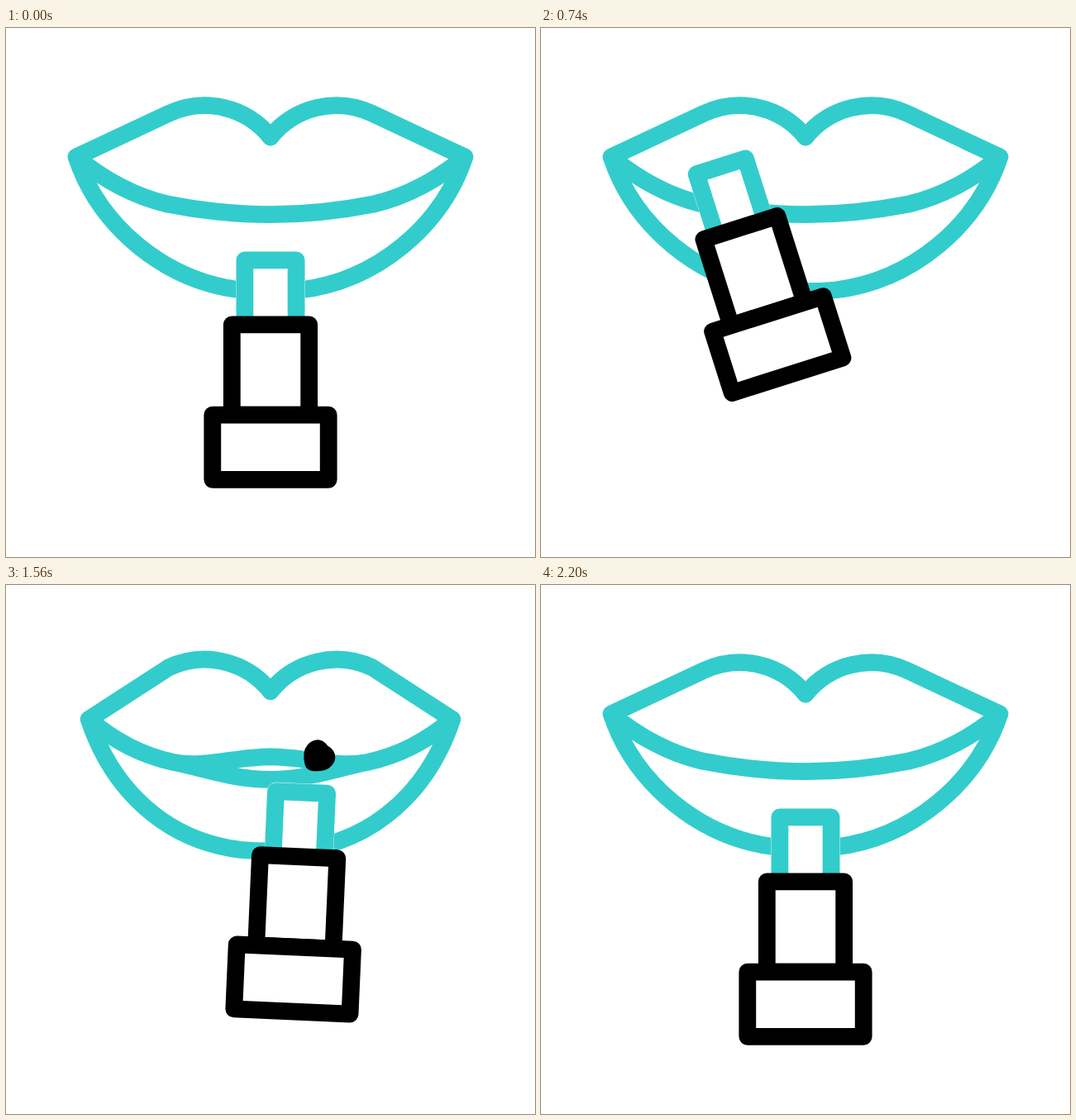
Recreate the animation shown at these times as an HTML page. Size 640x640 px, loop 2.4 s.

```html
<!DOCTYPE html>
<html lang="en">
<head>
<meta charset="utf-8">
<title>Lipstick</title>
<style>
  html, body { margin: 0; width: 100%; height: 100%; overflow: hidden; background: #fff; }
  svg { display: block; width: 100%; height: 100%; }
  path, rect { stroke-width: 20.8; stroke-linecap: round; stroke-linejoin: round; }
  .teal { stroke: #3cc; }
  .ink { stroke: #000; }
</style>
</head>
<body>
<svg viewBox="0 0 640 640" fill="#fff">
  <path id="half" class="teal" fill="none"/>
  <use href="#half" transform="matrix(-1 0 0 1 640 0)"/>
  <g id="stick">
    <path d="M-31.1 -54.8V-132.7H31.1V-54.8" stroke="#fff" style="stroke-width:21.4;stroke-linecap:butt"/>
    <path class="teal" d="M-31.1 -54.8V-132.7H31.1V-54.8"/>
    <rect class="ink" x="-46.7" y="-54.8" width="93.4" height="109.4"/>
    <rect class="ink" x="-70.2" y="54.6" width="140.4" height="78.1"/>
  </g>
  <path id="heart" class="ink" d="M0 63.4C34 40 57.5 12 57.5 -12S46 -45 30 -45S6 -40 0 -31.6
    C-6 -40 -14 -45 -30 -45S-57.5 -36 -57.5 -12S-34 40 0 63.4Z"/>
</svg>
<script>
const LOOP = 2400;
const LINE = 20.8;
const [half, stick, heart] = ['half', 'stick', 'heart'].map(id => document.getElementById(id));

const mix = (a, b, k) => a + (b - a) * k;
const ease = (t, from, to) => {
  const k = Math.min(1, Math.max(0, (t - from) / (to - from)));
  return k * k * (3 - 2 * k);
};

// Lipstick poses; bend bows the way to the next pose up or down
const POSES = [
  { at: 0, x: 320, y: 413.6, turn: 0, bend: 69 },
  { at: 560, x: 209, y: 302, turn: -24.9, bend: -218 },
  { at: 1170, x: 440, y: 299.7, turn: 9.46, bend: 0 },
  { at: 1760, x: 320, y: 413.6, turn: 0, bend: 0 }
];

function drawStick(t) {
  const next = POSES.findIndex(p => p.at > t);
  const i = next < 0 ? POSES.length - 2 : next - 1;
  const a = POSES[i], b = POSES[i + 1];
  const k = ease(t, a.at, b.at);
  const x = mix(a.x, b.x, k);
  const y = mix(a.y, b.y, k) + a.bend * k * k * (1 - k);
  stick.setAttribute('transform', `translate(${x} ${y}) rotate(${mix(a.turn, b.turn, k)})`);
}

// Left half of the mouth; k = 0 closed, k = 1 smiling
function drawLips(k) {
  const cx = 85 + 16.5 * k, cy = 156 + 7 * k;
  const sx = 195 + 8 * k, sy = 213 + 1.5 * k;
  const by = 317 + 3.7 * k;
  const corner = `M${cx} ${cy}`;
  const seam = y => `M${sx} ${sy}c38 7.5 ${275 - sx} ${y - sy} ${320 - sx} ${y - sy}`;
  half.setAttribute('d', [
    `${corner}L197 ${103.4 - 4 * k}A102 102 0 0 1 320 ${132 - 3.7 * k}`,
    `${corner}C${cx + 32} ${cy + 27} ${sx - 39} ${sy - 9} ${sx} ${sy}`,
    seam(225.7 - 19.3 * k),
    seam(225.7 + 10.5 * k),
    `${corner}C${cx + 28} ${cy + 84} 192 ${by - 11} 284 ${by}q18 1.6 36 1.6`
  ].join(''));
}

function drawHeart(t) {
  const grow = ease(t, 1475, 1820);
  const size = grow * (1 - ease(t, 2010, 2240));
  const shown = size > 0 && t < 2200;
  heart.style.display = shown ? '' : 'none';
  if (!shown) return;
  const p = ease(t, 1362, 2116);
  const x = mix(340, 562, p);
  const y = 226 - 100 * p - 50 * p * p;
  heart.setAttribute('transform',
    `translate(${x} ${y}) rotate(${mix(45, 25.5, grow)}) scale(${size})`);
  heart.style.strokeWidth = LINE / size;
}

function draw(t) {
  drawStick(t);
  drawLips(ease(t, 1280, 1620) - ease(t, 1900, 2160));
  drawHeart(t);
}

const start = performance.now();
function tick() {
  draw((performance.now() - start) % LOOP);
  requestAnimationFrame(tick);
}
draw(0);
requestAnimationFrame(tick);
</script>
</body>
</html>
```
